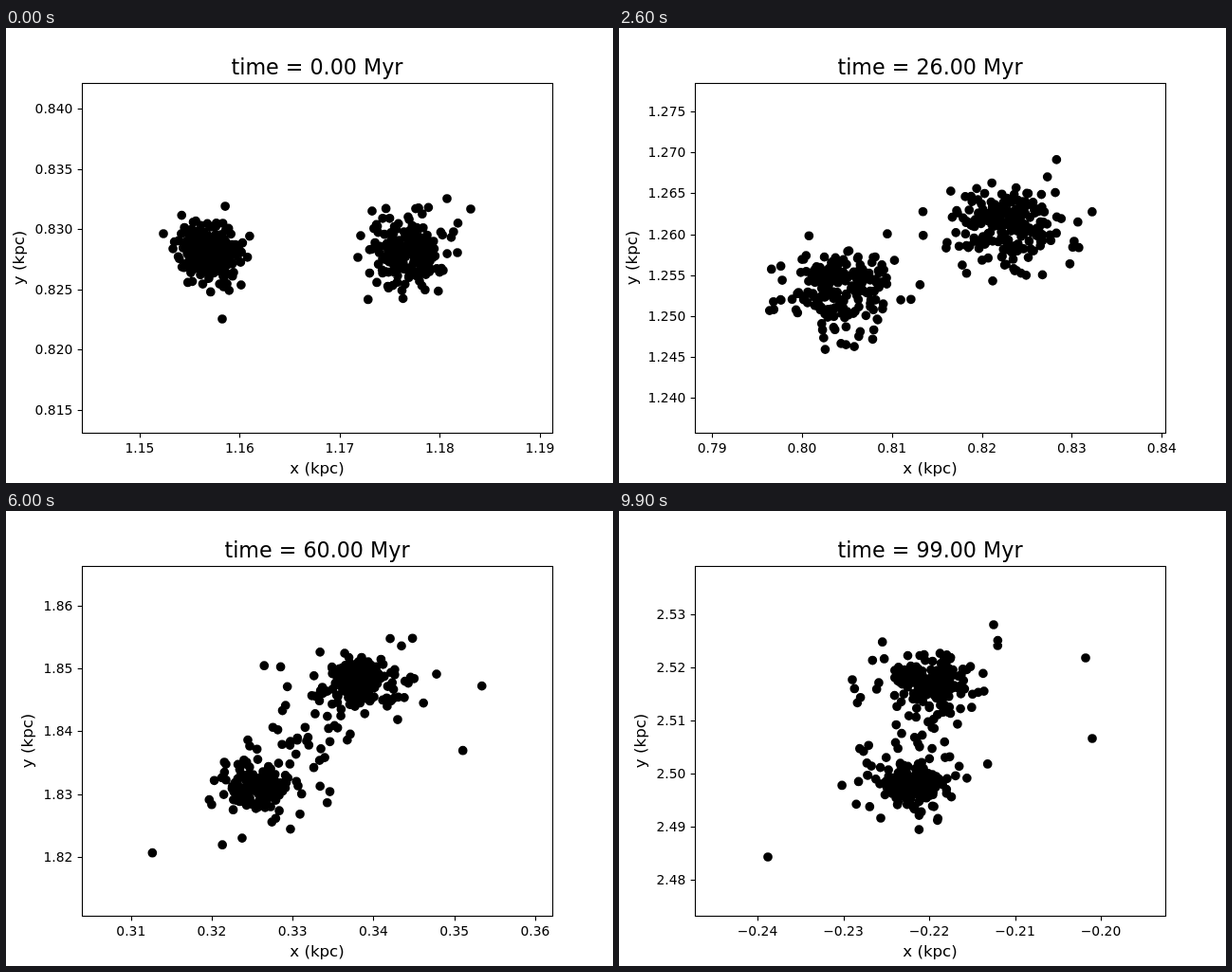
Animation, 640 px wide and 480 px high, one loop 10000 ms. Source, as an HTML page:

```html
<!DOCTYPE html>
<html lang="en">
<head>
<meta charset="utf-8">
<title>Two star clusters</title>
<style>
  html, body { margin: 0; width: 100%; height: 100%; overflow: hidden; background: #fff; }
  svg { display: block; width: 100vw; height: 100vh; }
  text { font-family: "DejaVu Sans", Verdana, sans-serif; font-size: 13.89px; text-anchor: middle; }
  .label { font-size: 16.67px; }
  #title { font-size: 22.22px; }
  #yTicks text { text-anchor: end; }
  .line { fill: none; stroke: #000; stroke-width: 1.11; }
  #dots { fill: none; stroke: #000; stroke-width: 9.72; stroke-linecap: round; }
</style>
</head>
<body>
<svg viewBox="0 0 640 480">
  <path id="dots"/>
  <rect class="line" x="80.5" y="58.5" width="496" height="369"/>
  <g id="xTicks"></g>
  <g id="yTicks"></g>
  <text id="title" x="328" y="49"></text>
  <text class="label" x="328" y="470">x (kpc)</text>
  <text class="label" id="yLabel">y (kpc)</text>
</svg>
<script>
const FRAME_MS = 100, FRAMES = 100, LAST_STEP = 98;
const BOX = { left: 80, right: 576, top: 57.6, bottom: 427.2 };
const MID_X = (BOX.left + BOX.right) / 2, MID_Y = (BOX.top + BOX.bottom) / 2;

// The view drifts steadily; these are its small deviations and its extent, in kpc
const KEYS = [0, 7, 25, 39, 59, 98];
const VIEW = {
  dx: [0, 0, 0.0005, 0.0011, 0.0007, 0],
  dy: [0, 0.0002, 0.0013, 0.001, 0.0003, 0],
  width: [0.047, 0.0468, 0.0523, 0.0556, 0.0582, 0.0548],
  height: [0.0291, 0.031, 0.0429, 0.0504, 0.0558, 0.066]
};

// Outermost stars: first, middle and last place
const STRAYS = [
  [[166, 217], [155, 348], [157, 365]],
  [[228, 307], [222, 352], [276, 324]],
  [[490, 191], [502, 189], [492, 155]],
  [[476, 237], [479, 253], [499, 240]],
  [[465, 180], [436, 140], [395, 120]],
  [[371, 242], [284, 168], [246, 178]]
];

const byId = id => document.getElementById(id);
const mix = (a, b, t) => a + (b - a) * t;
const snap = v => Math.floor(v + 0.5) + 0.5;
const hump = (step, middle, width) => Math.exp(-(((step - middle) / width) ** 2));
const ease = t => t * t * (3 - 2 * t);

function seeded(seed) {
  return () => {
    seed = (seed + 0x6D2B79F5) | 0;
    let t = Math.imul(seed ^ (seed >>> 15), 1 | seed);
    t = (t + Math.imul(t ^ (t >>> 7), 61 | t)) ^ t;
    return ((t ^ (t >>> 14)) >>> 0) / 4294967296;
  };
}
const random = seeded(41);
// Bell-shaped, unit variance, bounded
const bell = () => 2 * (random() + random() + random()) - 3;

// Cubic Hermite curve through the values at KEYS
function track(values, step) {
  const last = KEYS.length - 1;
  let i = 0;
  while (i < last - 1 && step > KEYS[i + 1]) i++;
  const slope = j => {
    const a = Math.max(j - 1, 0), b = Math.min(j + 1, last);
    return (values[b] - values[a]) / (KEYS[b] - KEYS[a]);
  };
  const span = KEYS[i + 1] - KEYS[i];
  const t = (step - KEYS[i]) / span, t2 = t * t, t3 = t2 * t;
  return mix(values[i], values[i + 1], ease(t))
    + span * ((t3 - 2 * t2 + t) * slope(i) + (t3 - t2) * slope(i + 1));
}

// Parabola through three values at u = 0, 0.5 and 1
const through = (a, b, c, u) =>
  a * (2 * u - 1) * (u - 1) + b * 4 * u * (1 - u) + c * u * (2 * u - 1);

const makeStars = count => Array.from({ length: count }, (_, i) => ({
  ax: bell(), bx: bell(), ay: bell(), by: bell(),
  rate: 0.05 + 0.07 * random(),
  halo: i % 5 === 0,
  bridge: i % 13 === 3,
  along: 0.15 + 0.7 * random()
}));
const clusters = [{ side: -1, stars: makeStars(190) }, { side: 1, stars: makeStars(195) }];

const dot = (x, y) => `M${x.toFixed(2)} ${y.toFixed(2)}h0`;

function drawStars(step) {
  const u = step / LAST_STEP, grown = Math.min(step / 60, 1);
  // The pair swings round its middle while each cluster swells, then tightens
  const swell = hump(step, 27, 15);
  const mid = { x: 320, y: 235 + 9 * swell };
  const half = { x: 105 * (1 - 0.9 * u ** 1.2), y: -55 * Math.sin(grown * Math.PI / 2) };
  const spread = { x: 18 + 9 * swell, y: mix(18.5, 12, ease(grown)) + 7 * swell };
  const haloSize = 1.1 + 0.8 * grown ** 2;
  const bridge = ease(Math.min(Math.max((step - 25) / 25, 0), 1)) * mix(1, 0.4, u ** 4);

  let d = "";
  for (const { side, stars } of clusters) {
    for (const s of stars) {
      const cos = Math.cos(s.rate * step), sin = Math.sin(s.rate * step);
      const gx = s.ax * cos + s.bx * sin, gy = s.ay * cos + s.by * sin;
      const size = s.halo ? haloSize : 1;
      const pull = s.bridge ? bridge : 0;
      const place = mix(side, 2 * s.along - 1, pull);
      d += dot(
        mid.x + half.x * place + gx * mix(spread.x * size, 22, pull),
        mid.y + half.y * place + gy * mix(spread.y * size, 16, pull));
    }
  }
  for (const [a, b, c] of STRAYS) d += dot(through(a[0], b[0], c[0], u), through(a[1], b[1], c[1], u));
  byId("dots").setAttribute("d", d);
}

function ticks(centre, range, gap, draw) {
  const end = Math.floor((centre + range / 2) / gap);
  let out = "";
  for (let i = Math.ceil((centre - range / 2) / gap); i <= end; i++) out += draw(i * gap);
  return out;
}

function drawAxes(step) {
  const x0 = 1.16773 - 0.0141594 * step + track(VIEW.dx, step);
  const y0 = 0.82761 + 0.0171283 * step + track(VIEW.dy, step);
  const width = track(VIEW.width, step), height = track(VIEW.height, step);
  const fine = height < 0.045;

  byId("xTicks").innerHTML = ticks(x0, width, 0.01, value => {
    const x = MID_X + (value - x0) / width * (BOX.right - BOX.left);
    const label = value.toFixed(2).replace("-", "\u2212");
    return `<path class="line" d="M${snap(x)} 427.5v4.86"/><text x="${x.toFixed(1)}" y="448">${label}</text>`;
  });
  byId("yTicks").innerHTML = ticks(y0, height, fine ? 0.005 : 0.01, value => {
    const y = MID_Y - (value - y0) / height * (BOX.bottom - BOX.top);
    return `<path class="line" d="M80.5 ${snap(y)}h-4.86"/><text x="70.3" y="${Math.round(y + 5)}">${value.toFixed(fine ? 3 : 2)}</text>`;
  });
  byId("yLabel").setAttribute("transform", `translate(${fine ? 19 : 28} ${MID_Y}) rotate(-90)`);
}

let shown = -1;
function tick(now) {
  const frame = Math.floor(now / FRAME_MS) % FRAMES;
  if (frame !== shown) {
    shown = frame;
    // The first state is held for two frames
    const step = Math.max(frame - 1, 0);
    byId("title").textContent = `time = ${frame.toFixed(2)} Myr`;
    drawAxes(step);
    drawStars(step);
  }
  requestAnimationFrame(tick);
}
tick(0);
</script>
</body>
</html>
```
